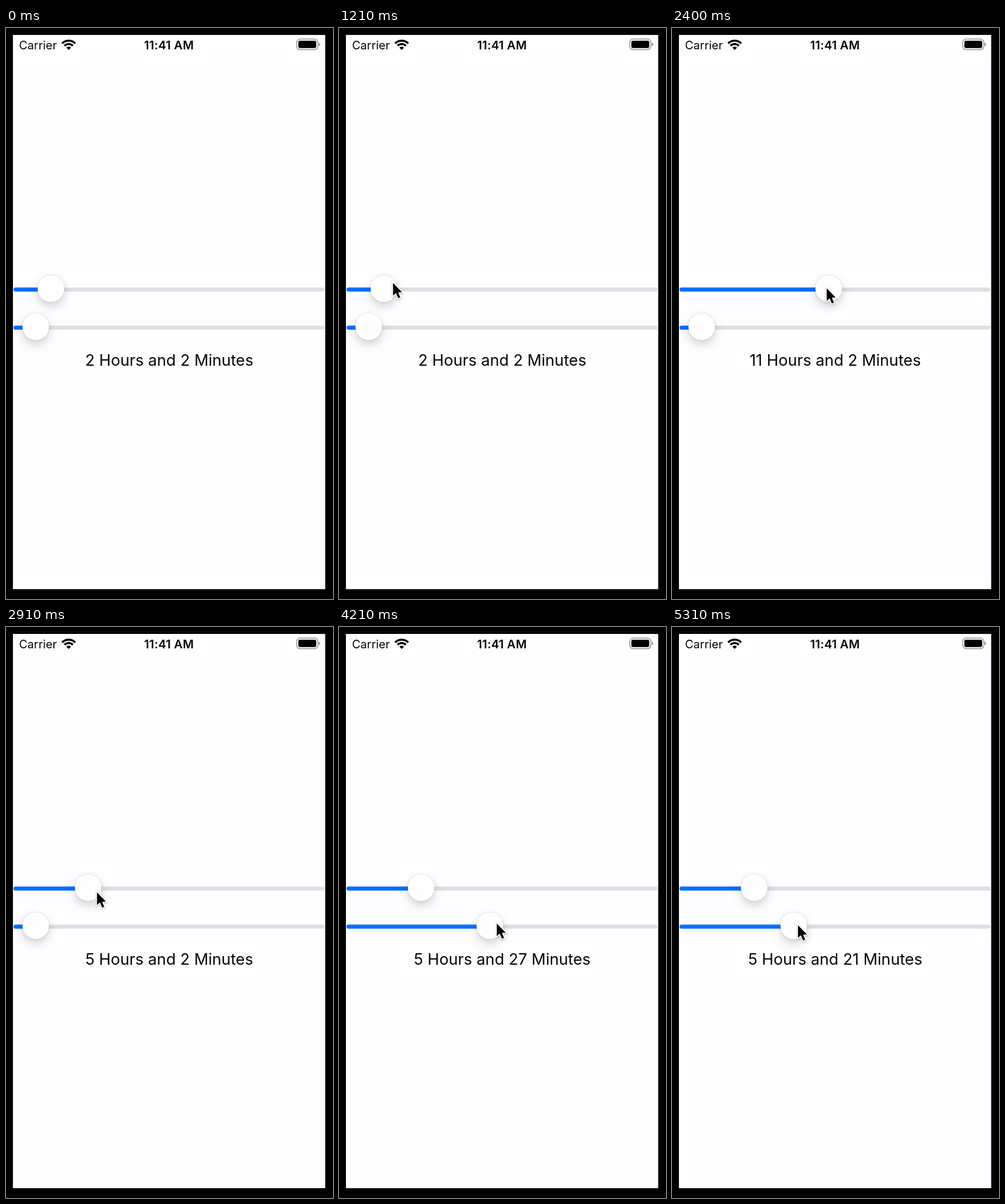
An HTML page that plays this animation: 566 by 989 pixels, repeating every 5.73 s.

```html
<!DOCTYPE html>
<html lang="en">
<head>
<meta charset="utf-8">
<title>Time sliders</title>
<style>
html, body { margin: 0; width: 100%; height: 100%; overflow: hidden; background: #000; }
svg { display: block; width: 566px; height: 989px; }
text { font-family: Inter, Roboto, sans-serif; font-optical-sizing: none; fill: #050505; }
.thumb {
  fill: #fffeff;
  filter: drop-shadow(0 8px 9px rgba(0, 0, 0, .16)) drop-shadow(0 0 2px rgba(0, 0, 0, .12));
}
.track { stroke: #dfdee1; }
.fill { stroke: #006fff; }
.track, .fill { stroke-width: 7; stroke-linecap: round; }
#cursor { filter: drop-shadow(0 1px 1px rgba(0, 0, 0, .3)); }
</style>
</head>
<body>
<svg viewBox="0 0 566 989">
  <rect width="566" height="989"/>
  <rect x="12" y="12" width="540.5" height="960" fill="#fefdff"/>

  <text x="22.5" y="36.5" font-size="20">Carrier</text>
  <text x="282" y="36.5" font-size="20.5" font-weight="600" letter-spacing=".2" text-anchor="middle">11:41 AM</text>
  <g fill="none" stroke="#000" stroke-width="3.6">
    <path d="M97.2 26.7a16 16 0 0 1 22.6 0M101.3 30.8a10.2 10.2 0 0 1 14.4 0"/>
    <path d="M108.5 38l-4-4a5.7 5.7 0 0 1 8 0z" fill="#000" stroke="none"/>
  </g>
  <rect x="503.3" y="19.3" width="36.4" height="18.2" rx="5.5" fill="none" stroke="#929194" stroke-width="1.5"/>
  <rect x="506" y="22" width="31" height="12.8" rx="3.2"/>
  <path d="M541.3 25.5q2.6 1 2.6 3t-2.6 3z" fill="#929194"/>

  <g id="sliders"></g>
  <text id="label" x="282.5" y="585" font-size="27.2" text-anchor="middle"></text>
  <path id="cursor" d="M.5 1.5v22l5-4.5 4 9 3.6-1.5-3.7-8.6 6.6-.4z"
        stroke="#fff" stroke-width="3.6" paint-order="stroke"/>
</svg>
<script>
const LOOP = 5730, ENTER = 120, MIN_X = 34.7, SPAN = 494.5;
const $ = id => document.getElementById(id);

// Each glide of the pointer starts where the one before it ended
const entry = { x: 0, y: 573 };
const glides = [
  { from: ENTER, to: 570, x: 125, y: 430 },  // enter
  { from: 570, to: 1030, x: 93, y: 440 },    // reach the hours
  { from: 1210, to: 2050, x: 272, y: 449 },  // drag up
  { from: 2330, to: 2910, x: 157, y: 458 },  // drag back
  { from: 2910, to: 3370, x: 63, y: 511 },   // reach the minutes
  { from: 3580, to: 4340, x: 290, y: 512 },  // drag up
  { from: 4340, to: 4790, x: 229, y: 513 },  // drag back
  { from: 4970, to: 5090, x: 217.5, y: 515 } // settle
];

const clamp = (v, lo, hi) => Math.min(Math.max(v, lo), hi);
const ease = u => u * u * (3 - 2 * u);

function pointer(t) {
  return glides.reduce((p, g) => {
    const s = ease(clamp((t - g.from) / (g.to - g.from), 0, 1));
    return { x: p.x + (g.x - p.x) * s, y: p.y + (g.y - p.y) * s };
  }, entry);
}

// A slider follows the pointer between start and end, snapping to whole steps
function makeSlider(y, max, grab, start, end) {
  const step = SPAN / max;
  const g = document.createElementNS('http://www.w3.org/2000/svg', 'g');
  g.innerHTML = `<path class="track" d="M16.5 ${y}H547.7"/>
    <path class="fill"/><circle class="thumb" cy="${y - 1.5}" r="23"/>`;
  $('sliders').append(g);
  const [, fill, thumb] = g.children;
  return t => {
    const value = Math.round((pointer(clamp(t, start, end)).x - grab) / step);
    const x = MIN_X + value * step;
    fill.setAttribute('d', `M16.5 ${y}H${x}`);
    thumb.setAttribute('cx', x);
    return value;
  };
}

const hours = makeSlider(453, 23, 40, 1210, 2910);
const minutes = makeSlider(519, 59, 44.2, 3580, LOOP);

function draw(t) {
  const { x, y } = pointer(t);
  $('label').textContent = `${hours(t)} Hours and ${minutes(t)} Minutes`;
  $('cursor').setAttribute('transform', `translate(${x} ${y})`);
  $('cursor').style.display = t < ENTER ? 'none' : '';
}

const began = performance.now();
function tick() {
  draw((performance.now() - began) % LOOP);
  requestAnimationFrame(tick);
}
tick();
</script>
</body>
</html>
```
